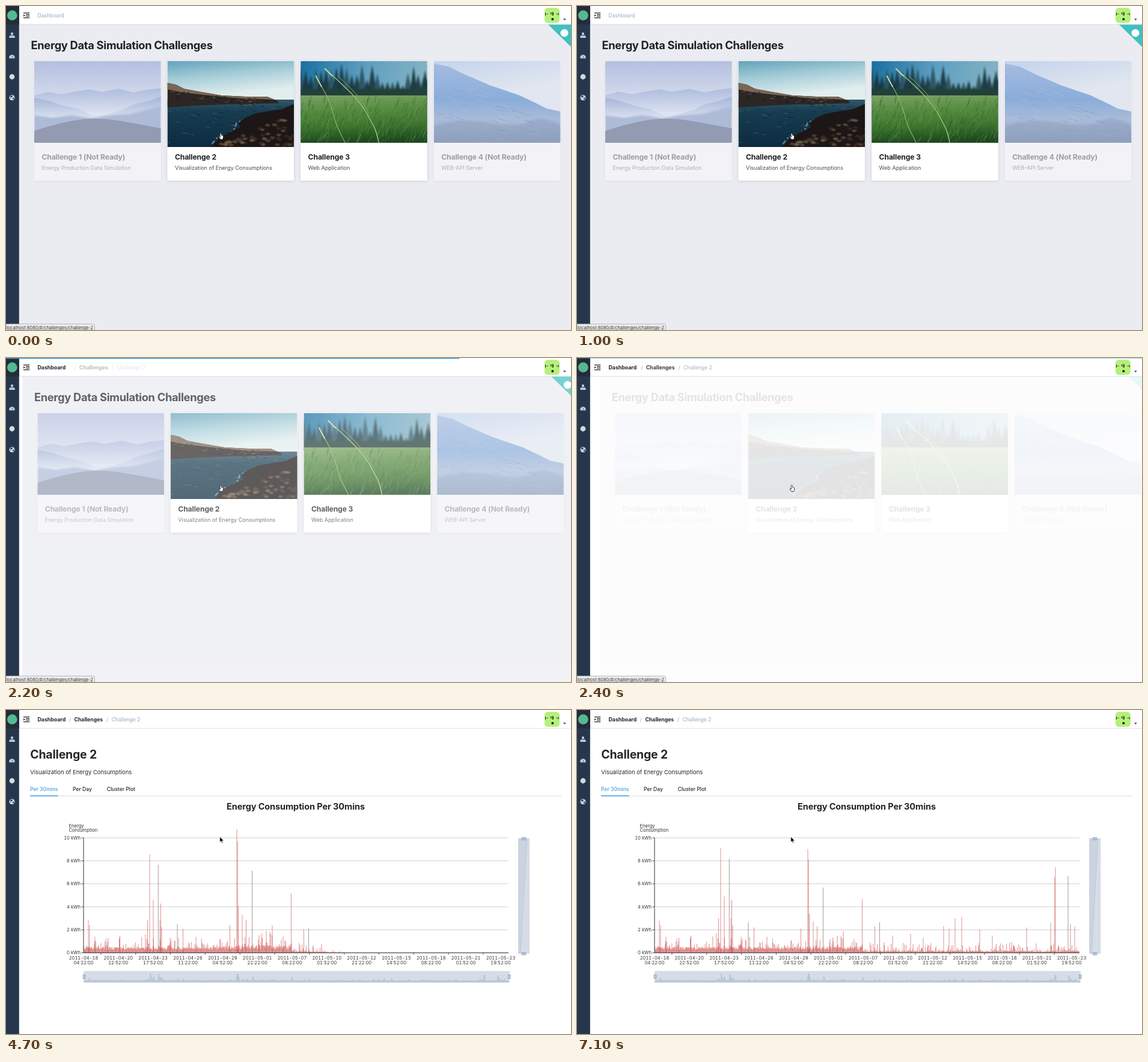
These frames come from a looping animation (940 px wide and 540 px high, 7200 ms). An HTML page:

```html
<!DOCTYPE html>
<html lang="en">
<head>
<meta charset="utf-8">
<title>Energy dashboard</title>
<style>
html, body { margin: 0; width: 100%; height: 100%; overflow: hidden; background: #fff; }
#stage { display: block; width: 100vw; height: 100vh; font-family: Inter, sans-serif; }
.axis { font-variant-numeric: tabular-nums; }
</style>
</head>
<body>
<svg id="stage" viewBox="0 0 940 540">
  <defs>
    <linearGradient id="mist" x2="0" y2="1"><stop stop-color="#b4bfe0"/><stop offset=".35" stop-color="#cdd5ea"/><stop offset=".6" stop-color="#dde4f1"/></linearGradient>
    <linearGradient id="slope" x2="0" y2="1"><stop stop-color="#a5b4d8"/><stop offset="1" stop-color="#d6deee"/></linearGradient>
    <linearGradient id="coast" x2=".15" y2="1"><stop stop-color="#64a3bb"/><stop offset=".22" stop-color="#a5cdd8"/><stop offset=".45" stop-color="#e2eeee"/></linearGradient>
    <linearGradient id="sea" x2="0" y2="1"><stop stop-color="#34586a"/><stop offset=".25" stop-color="#173c50"/><stop offset="1" stop-color="#0d2b40"/></linearGradient>
    <linearGradient id="sky" x2="1" y2=".2"><stop stop-color="#176fa0"/><stop offset=".5" stop-color="#5d9fc0"/><stop offset="1" stop-color="#86b3c4"/></linearGradient>
    <linearGradient id="grass" x2=".1" y2="1"><stop stop-color="#7aa365"/><stop offset=".35" stop-color="#558a40"/><stop offset=".7" stop-color="#3c742f"/><stop offset="1" stop-color="#1e4a1e"/></linearGradient>
    <linearGradient id="haze" x2=".3" y2="1"><stop stop-color="#c3d3ed"/><stop offset=".5" stop-color="#e1e6f0"/></linearGradient>
    <linearGradient id="wave" x2="0" y2="1"><stop stop-color="#a3bbdf"/><stop offset=".45" stop-color="#8badda"/><stop offset=".7" stop-color="#a9bbd8"/><stop offset="1" stop-color="#93a4c1"/></linearGradient>
    <filter id="shadow" x="-10%" y="-10%" width="120%" height="120%"><feDropShadow dx="0" dy="1" stdDeviation="2.5" flood-opacity=".13"/></filter>
    <filter id="soft"><feGaussianBlur stdDeviation="1.5"/></filter>
  </defs>
  <g id="home"></g>
  <g id="detail"></g>
  <g id="header"></g>
  <g id="sidebar"></g>
  <rect id="progress" height="1.3" fill="#29d"/>
  <g id="status">
    <path d="M0 530H145Q147.500 530 147.500 532.500V540H0Z" fill="#ececee" stroke="#a9a9ac" stroke-width=".8"/>
  </g>
  <path id="hand" d="M356 213.500q0-1.500 1.200-1.500t1.200 1.500l.3 2 1 .2 1 .3 1 .8-.5 4-1 1.700h-3.300l-2.700-3.800q-.3-1.500 1-1l1.300 1z" fill="#fff" stroke="#111" stroke-width=".8"/>
  <path id="arrow" d="M355.800 211.300v9l2.100-1.900 1.400 3.200 1.500-.7-1.400-3h2.800z" fill="#000" stroke="#fff" stroke-width=".6"/>
</svg>
<script>
const LOOP = 7200, STEP = 100;
const LEAVE = 2100, ENTER = 2600, FADE = 500, SLIDE = 18.3;
const CHART = 4000, GROW = 1000;
const LEFT = 129, RIGHT = 836, BASE = 404.7, UNIT = 19.17;

const $ = id => document.getElementById(id);
const add = (id, markup) => $(id).insertAdjacentHTML('beforeend', markup);
const range = (n, f) => Array.from({ length: n }, (_, i) => f(i)).join('');
const text = (x, y, size, str, fill = '#25262b', weight = 400, extra = '') =>
  `<text x="${x}" y="${y}" font-size="${size}" fill="${fill}" font-weight="${weight}" ${extra}>${str}</text>`;
const rect = (x, y, w, h, fill, extra = '') =>
  `<rect x="${x}" y="${y}" width="${w}" height="${h}" fill="${fill}" ${extra}/>`;
const path = (d, fill, extra = '') => `<path d="${d}" fill="${fill}" ${extra}/>`;
const line = (d, stroke, width = 1, extra = '') =>
  path(d, 'none', `stroke="${stroke}" stroke-width="${width}" ${extra}`);
const dot = (x, y, r, fill) => `<circle cx="${x}" cy="${y}" r="${r}" fill="${fill}"/>`;

let seed = 7;
const random = () => (seed = seed * 16807 % 2147483647) / 2147483647;
const between = (a, b) => a + (b - a) * random();

// Card pictures, in coordinates local to each card
const mountains = rect(0, 0, 211, 136, 'url(#mist)') +
  path('M0 57L22 51 45 55 70 50 92 47 112 51 140 46 165 52 190 47 211 45V85H0Z', 'url(#slope)', 'opacity=".75"') +
  path('M0 61L25 66 45 73 75 80 100 92H0Z', 'url(#slope)') +
  path('M211 59L190 66 165 72 145 82 115 90 100 94H211Z', 'url(#slope)') +
  path('M0 90L30 94 62 90 95 95 130 90 160 88 211 75V136H0Z', '#aebbd7', 'filter="url(#soft)"') +
  path('M0 116Q30 106 60 100Q98 92 140 99Q175 105 211 112V136H0Z', '#929bb2');

const coast = rect(0, 0, 211, 143, 'url(#coast)') + rect(0, 64, 211, 80, 'url(#sea)') +
  range(90, () => line(`M${between(0, 190)} ${between(74, 140)}l${between(3, 11)} 1`, random() < .35 ? '#5d8294' : '#071c2b', .9, 'opacity=".5"')) +
  path('M0 36L14 39 28 46 55 51 90 57 130 59 166 59 183 66 186 70 150 71 95 72 50 74 0 77Z', '#2c2624') +
  path('M0 36L14 39 28 46 55 51 90 57 130 59 166 59 178 64 120 62 60 56 25 52 0 47Z', '#7a6654') +
  range(55, () => { const x = between(0, 165); return rect(x, 48 + x * .09 + between(0, 14), between(2, 6), 1.5, random() < .6 ? '#15171a' : '#75604f', 'opacity=".6"'); }) +
  line('M74 138L84 126 103 121 112 112 115 103 130 96 148 90', '#a9c4cc', 2.5, 'opacity=".55" stroke-dasharray="7 4 3 3"') +
  path('M211 71L190 80 171 83 147 87 128 95 117 104 121 110 104 118 88 126 73 143H211Z', '#1c1716') +
  range(70, () => { const x = between(85, 211), y = between(142 - (x - 75) * .4, 142);
    return path(`M${x} ${y}l3-3 5 1 1 2-4 2z`, random() < .5 ? '#715a45' : '#403128', 'opacity=".6"'); });

const meadow = rect(0, 0, 211, 136, 'url(#sky)') +
  '<g filter="url(#soft)">' + range(26, i => {
    const x = i * 8.5, top = i < 15 ? between(4, 32) : between(18, 42);
    return path(`M${x} ${top}L${x + 9} 62H${x - 9}Z`, i % 3 ? '#15343f' : '#2a505a', 'opacity=".9"');
  }) + path('M180 65L188 8 196 65ZM198 65L207 15 216 65Z', '#1c3c42') + rect(-5, 46, 222, 16, '#203f38') + '</g>' +
  rect(0, 57, 211, 79, 'url(#grass)') +
  range(260, () => { const x = between(-5, 211), y = between(68, 142);
    return line(`M${x} ${y}q1-6 ${between(2, 7)}-${between(7, 14)}`, random() < .5 ? '#79a755' : '#1d4a1f', .9, 'opacity=".45"'); }) +
  line('M25 24C38 48 49 65 55 90S67 120 74 136', '#91b56b', 1.1) +
  line('M40 12C70 40 95 60 110 87S126 116 130 136', '#a5c47c', 1.4) +
  line('M62 25C85 45 103 65 114 88', '#88ad65', 1) +
  line('M25 24L35 43M40 12L53 25', '#ccd4a4', 1.8);

const ocean = rect(0, 0, 211, 136, 'url(#haze)') +
  path('M0 4L25 9 49 21 93 40 143 57 170 70 188 79 211 84V136H0Z', 'url(#wave)') +
  range(90, () => { const x = between(-10, 200), y = between(16 + x * .42, 136);
    return line(`M${x} ${y}l${between(6, 18)} ${between(2, 6)}`, random() < .5 ? '#bccde6' : '#7590b9', 1, 'opacity=".4"'); }) +
  path('M0 108Q40 94 90 103T160 100T211 108V136H0Z', '#8899b8', 'opacity=".4" filter="url(#soft)"');

function card(x, title, subtitle, picture, height, ready) {
  const shade = ready ? 1 : .4;
  return rect(x, 92, 210.5, 199, '#fff', `rx="2.5" opacity="${shade}" filter="url(#shadow)"`) +
    `<svg x="${x}" y="92" width="210.5" height="${height}">${picture}</svg>` +
    `<g opacity="${shade}">` + text(x + 12.4, 256, 12.15, title, '#202125', 700, 'letter-spacing="-.12"') +
    text(x + 12.4, 273.2, 9.05, subtitle, '#4b4c51') + '</g>';
}
add('home', rect(22, 30, 918, 510, '#ebecf2') +
  text(41.5, 71.7, 18.3, 'Energy Data Simulation Challenges', '#202125', 700, 'letter-spacing="-.31"') +
  card(47, 'Challenge 1 (Not Ready)', 'Energy Production Data Simulation', mountains, 136, false) +
  card(268.5, 'Challenge 2', 'Visualization of Energy Consumptions', coast, 143, true) +
  card(490.2, 'Challenge 3', 'Web Application', meadow, 136, true) +
  card(711.8, 'Challenge 4 (Not Ready)', 'WEB-API Server', ocean, 136, false) +
  path('M902 31H940V68Z', '#40c0c0') + dot(929, 45, 6.5, '#fff'));

// Header and sidebar
add('header', rect(22, 0, 918, 30.5, '#fff') + rect(22, 30.3, 918, .9, '#d9dce3') +
  line('M29 11.700h10.200M33 14.400h6.200M33 16.900h6.200M29 19.600h10.200', '#222', 1.2) + path('M29.200 13.700v4l2.600-2z', '#222') +
  `<g id="crumbHome">${text(52.5, 18.6, 8.53, 'Dashboard', '#97a8be')}</g>` +
  `<g id="crumbs">${text(52.5, 18.6, 8.75, 'Dashboard', '#25262b', 700)}<g id="trail">` +
  text(105, 18.6, 8.6, '/', '#a0a4ac') + text(113.5, 18.6, 8.7, 'Challenges', '#25262b', 700) +
  text(167, 18.6, 8.6, '/', '#a0a4ac') + text(175.5, 18.6, 8.5, 'Challenge 2', '#97a8be') + '</g></g>' +
  rect(896, 3, 25, 25, '#b6f07c', 'rx="5.500"') +
  line('M897.500 11v5M899.500 13.500h2M905.500 13h2M906.500 10.500v3M909 10v6M910.500 10.500v5M915.500 13.500h2M919 11.500v4', '#26331c', 1.1) +
  dot(909.3, 22, 2, '#111') + path('M926.800 21.300h5l-2.500 2.700z', '#444'));

add('sidebar', rect(0, 0, 21.8, 540, '#26374d') + rect(0, 0, 21.8, 30.5, '#232c39') + dot(10.3, 15.6, 8.4, '#55b993') +
  path('M8.300 44.500h3.400v3H8.300zM5.600 50.300h2.800v2.700H5.600zM8.700 50.300h2.800v2.700H8.700zM11.800 50.300h2.800v2.700H11.800z', '#e4e8ee') +
  line('M10 47v3.500M7 50.500V49h6v1.500', '#e4e8ee', .7) +
  path('M5.500 87.200a4.700 4.700 0 1 1 9 0z', '#d7dde5') + line('M10 86.500l1.300-3.500M7.300 85.500h.8M12.500 85.500h.8M8.300 82.700h.8', '#26374d', .9) +
  dot(10, 118, 4.4, '#d3d9e1') + dot(10, 152.7, 4.5, '#d3d9e1') +
  path('M7 150l3-1 1 2-2 1-1 2zM11 153l2.500-.5-.5 2.500-1.500 1z', '#26374d'));

add('status', text(1, 538.6, 7.4, 'localhost:8080/#/challenges/challenge-2', '#333'));

// Chart data: sharp peaks as "x kWh", then a dense random floor
const peaks = ('137 2.8,139 2.4,148 1.4,169 1,189.5 1.5,232 1.7,235.5 3,239 9.1,245 4.9,256 3,257.5 4.6,259 2.4,' +
  '273 1.4,294.5 2.2,316 1.4,372.5 2.1,384 9,385.2 8.1,386.5 3.4,393 2.7,399.5 2.3,421 1.2,433 1.5,443 1.9,' +
  '461 1.2,474.5 4.7,495.5 2.3,525 1.5,555 1.65,576 1.3,610 2.3,619 2.1,629 3,640 3.1,670 2,691 1.5,748 2.2,' +
  '788 2.6,794.7 6.6,796 7.45,821 2.5,828 2.3').split(',').map(p => p.split(' ').map(Number));
const greyPeaks = [[253.3, 8.2], [285, 2.65], [409.5, 5.67], [503.5, 2.65], [817, 6.65]];
const floorBars = [];
for (let x = LEFT + .8; x < RIGHT; x += .85) {
  const busy = x < 475;
  floorBars.push([x, (busy ? between(.25, .52) : between(.06, .2)) + random() ** 7 * (busy ? 1 : .75)]);
}
const redBars = floorBars.concat(peaks);

const labels = ['04-18 04:22', '04-20 22:52', '04-23 17:52', '04-26 11:22', '04-29 04:52', '05-01 22:22', '05-07 08:22',
  '05-10 01:52', '05-12 21:22', '05-15 14:52', '05-18 08:22', '05-21 01:52', '05-23 19:52'];
const tickGap = 57.83;
const middle = 'text-anchor="middle"';
const handle = (x, y, w, h, bar) => rect(x - w / 2, y - h / 2, w, h, '#dfe6f0', 'stroke="#8299b9" stroke-width=".9"') + line(bar, '#8299b9', .8);
const preview = floorBars.filter((_, i) => i % 4 === 0).concat(peaks, greyPeaks).sort((a, b) => a[0] - b[0])
  .map(([x, v]) => `L${x + 1} ${451.5 - v * 1.4}`).join('');

const chart = '<g id="chart"><g class="axis">' +
  range(6, i => {
    const y = BASE - i * 2 * UNIT;
    return line(`M${LEFT} ${y}H${RIGHT}`, '#c4c4c4', .8) + line(`M${LEFT - 3.5} ${y}H${LEFT}`, '#333', .9) +
      text(124, y + 2.7, 7.55, `${i * 2} kWh`, '#333', 400, 'text-anchor="end"');
  }) +
  labels.map((label, i) => {
    const [day, time] = label.split(' '), x = LEFT + i * tickGap;
    return text(x, 416.3, 7.5, `2011-${day}`, '#333', 400, middle) +
      text(x, 423.8, 7.5, `${time}:00`, '#333', 400, middle) +
      (i < 12 ? line(`M${x + tickGap / 2} ${BASE}v3.200`, '#333', .8) : '');
  }).join('') +
  text(104.5, 196, 7.6, 'Energy', '#333') + text(104.5, 203.4, 7.6, 'Consumption', '#333') + '</g>' +
  line('', '#c23531', .9, 'id="red" opacity=".6"') + line('', '#7d6a6c', .9, 'id="grey" opacity=".75"') +
  line(`M${LEFT} 213V${BASE}H${RIGHT}`, '#333', 1) +
  rect(129.7, 435.5, 707.5, 18.5, '#d5dce8', 'stroke="#cbd0d9" stroke-width=".6"') +
  path(`M130 453.500${preview}L837 453.500Z`, '#bccada', 'stroke="#a3b5cb" stroke-width=".5"') +
  handle(130, 444.5, 3.6, 6, 'M130 442.500v4') + handle(837.2, 444.5, 3.6, 6, 'M837.200 442.500v4') +
  rect(852.5, 214, 18.3, 192, '#d6dce7', 'stroke="#cbd0d9" stroke-width=".6"') +
  path('M852.500 214H867L856 406H852.500Z', '#cad3df') + line('M867 214L856 406', '#b4c0d0', .6) +
  handle(861.5, 214.5, 6.5, 3.6, 'M860.500 213v3M862.500 213v3') + handle(861.5, 406.3, 6.5, 3.6, 'M860.500 405v3M862.500 405v3') + '</g>';

add('detail', text(40.2, 81, 19.5, 'Challenge 2', '#25262b', 700, 'letter-spacing="-.2"') +
  text(40.2, 107.4, 9.45, 'Visualization of Energy Consumptions') +
  rect(40, 142.6, 884, 1.2, '#dcdfe6') + rect(40, 142.4, 46.5, 1.5, '#46a0e0') +
  text(40, 134.8, 8.55, 'Per 30mins', '#46a0e0', 500) + text(111, 134.8, 8.55, 'Per Day', '#25262b', 500) +
  text(167.7, 134.8, 8.55, 'Cluster Plot', '#25262b', 500) +
  text(482, 166.2, 14.5, 'Energy Consumption Per 30mins', '#25262b', 700, middle + ' letter-spacing="-.1"') +
  `<g id="loading">${line('M481.400 309.100h1.600', '#c23531', 3, 'stroke-linecap="round"')}${text(494, 318, 7.8, 'loading', '#222')}</g>` + chart);

const clamp = v => Math.max(0, Math.min(1, v));
const bezier = (a, b, s) => 3 * a * s * (1 - s) ** 2 + 3 * b * s * s * (1 - s) + s ** 3;
// The CSS "ease" curve, solved by bisection
function ease(v) {
  v = clamp(v);
  let low = 0, high = 1;
  for (let i = 0; i < 20; i++) {
    const mid = (low + high) / 2;
    bezier(.25, .25, mid) < v ? low = mid : high = mid;
  }
  return bezier(.1, 1, low);
}
const elastic = k => k <= 0 ? 0 : k >= 1 ? 1 : 2 ** (-10 * k) * Math.sin((k - .1) * 5 * Math.PI) + 1;

// Bars spring up one after another from left to right
const growBars = (bars, t) => bars.map(([x, v]) => {
  const h = v * UNIT * elastic((t - 4700) / GROW + (566 - x) / 807);
  return h > 0 ? `M${x} ${BASE}v${(-h).toFixed(2)}` : '';
}).join('');

function show(id, visible) { $(id).style.display = visible ? '' : 'none'; }
function place(id, opacity, dx) {
  $(id).setAttribute('opacity', opacity);
  $(id).setAttribute('transform', `translate(${dx} 0)`);
}

function draw(t) {
  const leave = ease((t - LEAVE) / FADE), enter = ease((t - ENTER) / FADE);
  const left = t >= LEAVE, entered = t >= ENTER;
  place('home', 1 - leave, SLIDE * leave);
  place('detail', enter, SLIDE * (enter - 1));
  place('trail', leave, 12.2 * (1 - leave));
  show('home', !entered);
  show('detail', entered);
  show('crumbHome', !left);
  show('crumbs', left);
  show('status', !entered);
  show('hand', !entered);
  show('arrow', entered);
  $('progress').setAttribute('width', 940 * ease((t - LEAVE) / 200));
  $('progress').setAttribute('opacity', clamp(1 - (t - LEAVE - 180) / 180));
  show('loading', t < CHART);
  show('chart', t >= CHART);
  if (t >= CHART) {
    $('red').setAttribute('d', growBars(redBars, t));
    $('grey').setAttribute('d', growBars(greyPeaks, t));
  }
}

const start = performance.now();
let last = -1;
function tick() {
  const t = Math.floor((performance.now() - start) % LOOP / STEP) * STEP;
  if (t !== last) draw(last = t);
  requestAnimationFrame(tick);
}
tick();
</script>
</body>
</html>
```
